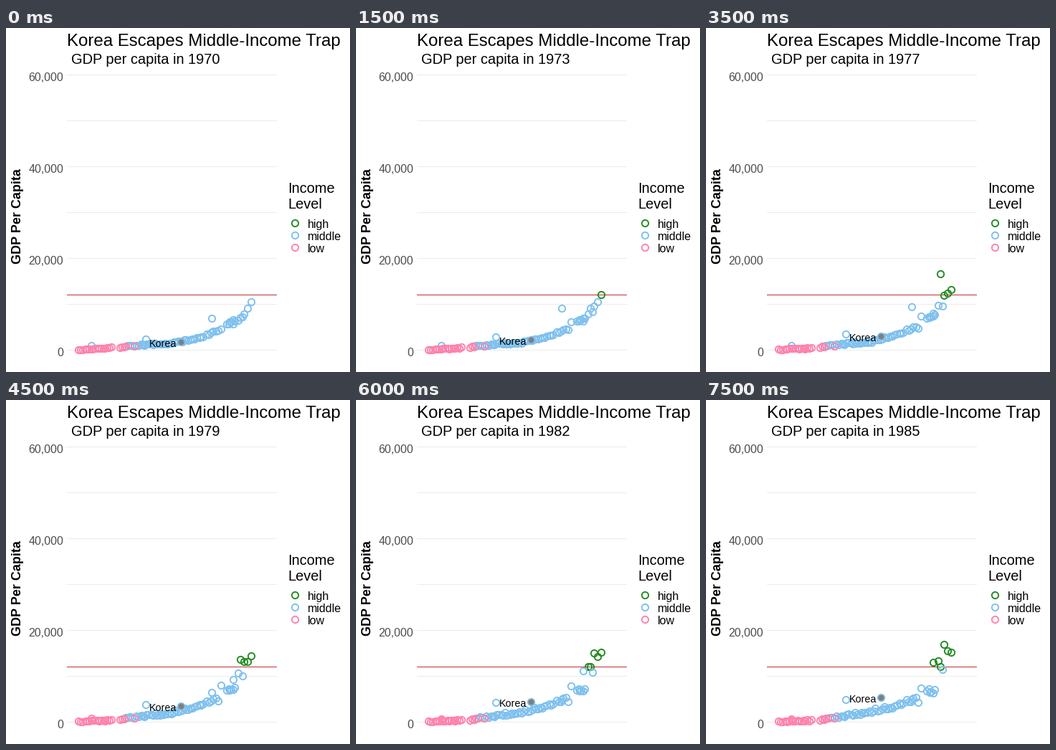
Write a matplotlib script that moves like this. It is 480 px wide and 480 px high and loops after 8000 ms.

```python
import numpy as np
import matplotlib.pyplot as plt
from matplotlib.animation import FuncAnimation

SIZE, DPI = 480, 100
PT = 72 / DPI                      # points per pixel
ZERO, PX_PER_K = 449.7, 6.4        # axis baseline and pixels per 1,000
LOW_MAX, HIGH_MIN = 0.96, 12.0
LEFT, RIGHT = 85, 378
COLORS = {"high": "#228B22", "middle": "#7EC0EE", "low": "#FF82AB"}
YEARS = np.arange(1970, 1986)

plt.rcParams["font.family"] = "Liberation Sans"

# GDP per capita (thousands) along the x axis, early, midway and late
CURVE_X = [102, 150, 190, 230, 260, 295, 320, 325, 342]
CURVES = {
    1970: [0.15, 0.6, 1.2, 1.6, 2.4, 4.2, 6.6, 7.0, 9.3],
    1977: [0.2, 0.55, 1.4, 1.9, 3.1, 5.0, 7.9, 10.6, 12.0],
    1985: [0.2, 0.5, 1.3, 2.5, 3.2, 5.0, 7.2, 14.8, 14.3],
}
# first x, last x and number of countries
CLUSTERS = [(102, 147, 17), (159, 260, 36), (263, 296, 11),
            (308, 319, 6), (324.5, 337.5, 4)]
# countries that leave the curve: x and their turning points
OUTLIERS = [
    (119, {1970: 1.05, 1975: 1.05, 1985: 0.7}),
    (195, {1970: 2.5, 1975: 3.1, 1985: 4.95}),
    (287, {1970: 7.0, 1973: 9.2, 1977: 9.5, 1980: 5.0}),
    (299.5, {1970: 4.6, 1973: 6.2, 1980: 8.4, 1985: 7.4}),
    (317, {1970: 5.8, 1975: 6.8, 1985: 13.1}),
    (326.5, {1970: 7.1, 1973: 9.2, 1975: 14.6, 1977: 16.7, 1980: 12.1}),
    (341.5, {1970: 10.6, 1973: 12.2, 1975: 11.95, 1980: 15.2}),
]
KOREA = (244, {1970: 1.85, 1975: 2.65, 1980: 3.75, 1985: 5.45})


def path(keys):
    return np.interp(YEARS, list(keys), list(keys.values()))


def crowd():
    rng = np.random.default_rng(11)
    t = (YEARS - YEARS[0]) / 15
    for start, end, count in CLUSTERS:
        step = (end - start) / (count - 1)
        for x in np.linspace(start, end, count):
            x += step * rng.uniform(-0.25, 0.25)
            level = path({y: np.interp(x, CURVE_X, c)
                          for y, c in CURVES.items()})
            offset, drift = rng.uniform(-1, 1, 2)
            value = level * (1 + 0.06 * offset + 0.18 * t * drift)
            yield x, np.maximum(value + 0.1 * offset, 0.1)


points = list(crowd()) + [(x, path(keys)) for x, keys in OUTLIERS + [KOREA]]
xs = np.array([x for x, _ in points])
gdp = np.array([v for _, v in points])
korea_x, korea_gdp = points[-1]


def to_y(value):
    return ZERO - value * PX_PER_K


fig = plt.figure(figsize=(SIZE / DPI, SIZE / DPI), dpi=DPI, facecolor="white")
ax = fig.add_axes([0, 0, 1, 1])
ax.set(xlim=(0, SIZE), ylim=(SIZE, 0))
ax.axis("off")


def label(x, y, text, size, **kw):
    return ax.text(x, y, text, fontsize=size * PT, va="baseline", **kw)


def rings(x, y, level, z=3):
    return ax.plot(x, y, "o", ms=9.3 * PT, mew=1.9 * PT, mfc="none",
                   mec=COLORS[level], zorder=z)[0]


def rule(value, color):
    y = np.floor(to_y(value)) + 0.5
    ax.plot([LEFT, RIGHT], [y, y], color=color, lw=PT, zorder=1,
            solid_capstyle="butt", snap=False)


for k in range(0, 61, 10):
    rule(k, "#EBEBEB")
    if k % 20 == 0:
        label(80, to_y(k) + 7.8, f"{k * 1000:,}", 16, ha="right",
              color="#4D4D4D")
rule(HIGH_MIN, "#BF3030")

label(LEFT, 24.5, "Korea Escapes Middle-Income Trap", 24)
subtitle = label(90.6, 50, "", 20)
label(21, 263, "GDP Per Capita", 18, weight="bold", ha="center",
      rotation=90, rotation_mode="anchor")

label(393, 230, "Income", 20)
label(393, 252, "Level", 20)
for i, name in enumerate(COLORS):
    rings([402.5], [272 + 17.2 * i], name)
    label(421.3, 278.7 + 17.3 * i, name, 16)

groups = {name: rings([], [], name, 3 + i) for i, name in enumerate(COLORS)}
dot, = ax.plot([], [], "o", ms=8 * PT, mew=0, color="#7F7F7F", zorder=6)
tag = label(238.5, 0, "Korea", 14.2, ha="right", zorder=7)


def update(i):
    now = gdp[:, i]
    masks = {"high": now >= HIGH_MIN, "low": now < LOW_MAX}
    masks["middle"] = ~(masks["high"] | masks["low"])
    for name, artist in groups.items():
        artist.set_data(xs[masks[name]], to_y(now[masks[name]]))
    y = to_y(korea_gdp[i])
    dot.set_data([korea_x], [y])
    tag.set_y(y + 6.8)
    subtitle.set_text(f"GDP per capita in {YEARS[i]}")
    return [*groups.values(), dot, tag, subtitle]


anim = FuncAnimation(fig, update, frames=len(YEARS), interval=500,
                     repeat=True, repeat_delay=0, blit=False)
plt.show()
```
